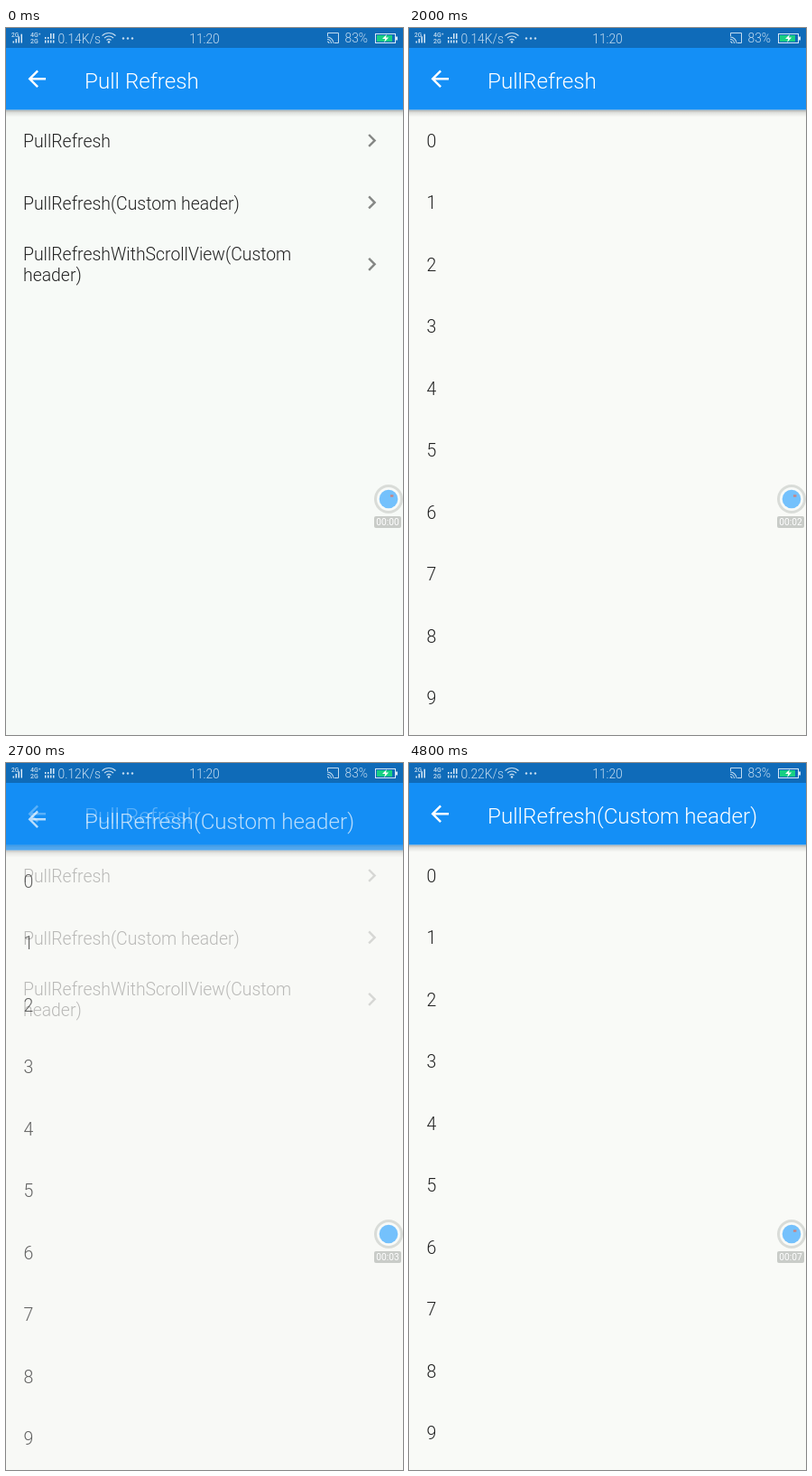
Animation, 440 px wide and 782 px high, one loop 4.9 s. Source, as an HTML page with a canvas:

```html
<!DOCTYPE html>
<html lang="zh">
<head>
<meta charset="utf-8">
<title>Pull Refresh</title>
<style>
html, body { margin: 0; width: 100%; height: 100%; overflow: hidden; background: #f7faf7; }
canvas { display: block; }
</style>
</head>
<body>
<canvas id="stage" width="440" height="782"></canvas>
<script>
const W = 440, H = 782, LOOP = 4900, ROW = 68.44, BAR = 90.5;
const c = document.getElementById('stage').getContext('2d');
const SANS = 'Roboto, "Noto Sans CJK SC", sans-serif';
const CJK = '"Noto Sans CJK SC", "Noto Sans CJK", sans-serif';
const BACK = new Path2D('M20 11H7.83l5.59-5.59L12 4l-8 8 8 8 1.41-1.41L7.83 13H20z');
const CHEVRON = new Path2D('M10 6L8.59 7.41 13.17 12l-4.58 4.59L10 18l6-6z');
const BOLT = new Path2D('M422 7l-5 5h3.3l-1.2 4 5-5.4h-3.2z');

// Keys are [time, value] pairs, linear in between
const FADE = [[200, 0], [300, .12], [400, .7], [500, 1], [2000, 1], [2100, .7], [2200, .3],
  [2300, 0], [2400, 0], [2500, .12], [2600, .38], [2700, .7], [2800, 1]];
const LIFT = [[200, 195], [300, 136], [400, 6], [500, 0], [2000, 0], [2100, 6], [2200, 80],
  [2300, 195], [2400, 195], [2500, 136], [2600, 40], [2700, 6], [2800, 0]];
const PULL = [[500, 0], [600, 70], [700, 122], [1500, 122], [1600, 60], [1700, 0], [2900, 0],
  [3100, 70], [3200, 125], [3300, 118], [3400, 98], [4500, 98], [4600, 55], [4700, 0]];
const RIPPLE = [[200, 0], [300, 103], [400, 0], [2300, 0], [2400, 48], [2500, 103], [2600, 0]];

function tween(t, keys) {
  const i = keys.findIndex(k => k[0] >= t);
  if (i < 0) return keys[keys.length - 1][1];
  if (i === 0) return keys[0][1];
  const [t0, v0] = keys[i - 1], [t1, v1] = keys[i];
  return v0 + (v1 - v0) * (t - t0) / (t1 - t0);
}

const ease = x => x * x * (3 - 2 * x);

function rect(x, y, w, h, color) {
  c.fillStyle = color;
  c.fillRect(x, y, w, h);
}

function text(str, x, y, size, color, weight = 300, family = SANS, align = 'left') {
  c.font = `${weight} ${size}px ${family}`;
  c.textAlign = align;
  c.fillStyle = color;
  c.fillText(str, x, y);
}

function disc(x, y, r, color) {
  c.fillStyle = color;
  c.beginPath();
  c.arc(x, y, r, 0, 7);
  c.fill();
}

function arc(x, y, r, from, to, width, color) {
  c.strokeStyle = color;
  c.lineWidth = width;
  c.beginPath();
  c.arc(x, y, r, from, to);
  c.stroke();
}

function icon(path, x, y, color) {
  c.save();
  c.translate(x, y);
  c.scale(1.222, 1.222);
  c.fillStyle = color;
  c.fill(path);
  c.restore();
}

function page(title, paper) {
  rect(0, BAR, W, H, paper);
  const shade = c.createLinearGradient(0, BAR, 0, BAR + 8);
  shade.addColorStop(0, 'rgba(0,0,0,.3)');
  shade.addColorStop(.4, 'rgba(0,0,0,.1)');
  shade.addColorStop(1, 'rgba(0,0,0,0)');
  rect(0, BAR, W, 8, shade);
  rect(0, 0, W, BAR, '#148ff6');
  icon(BACK, 19.6, 41.6, '#fff');
  text(title, 87, 66.5, 24.2, '#fff');
}

function menu(t) {
  page('Pull Refresh', '#f7faf7');
  const r = tween(t, RIPPLE);
  if (r) {
    c.save();
    c.beginPath();
    c.rect(0, BAR + (t > 2000 ? ROW : 0), W, ROW);
    c.clip();
    disc(329.5, t > 2000 ? 184 : 116, r, 'rgba(0,0,0,.06)');
    c.restore();
  }
  const lines = [['PullRefresh', 132], ['PullRefresh(Custom header)', 200.5],
    ['PullRefreshWithScrollView(Custom', 257], ['header)', 280]];
  for (const [str, y] of lines) text(str, 19, y, 19.4, '#222');
  for (let i = 0; i < 3; i++) icon(CHEVRON, 390.8, 109.8 + i * ROW, '#858785');
}

function header(t, custom, pull) {
  c.save();
  c.beginPath();
  c.rect(0, BAR, W, pull);
  c.clip();
  const sec = (t - (custom ? 3400 : 700)) * .00153;
  const turns = sec / 1.333 + (custom ? .38 : .5);
  const p = turns - Math.floor(turns);
  const head = ease(Math.min(1, p * 2)), tail = ease(Math.max(0, p * 2 - 1));
  const start = (custom ? -.4 : .35) + sec * 4.7 + (Math.floor(turns) + tail) * 4.7;
  arc(custom ? 175.5 : 174, 152.7, 12.3, start, start + .1 + (head - tail) * 4.6, 2.5, '#148ff6');
  text('正在刷新...', custom ? 195 : 196.5, 160, 17.1, custom ? '#222' : '#999', 300, CJK);
  c.restore();
}

function list(t) {
  const custom = t > 2350, pull = tween(t, PULL);
  c.save();
  c.globalAlpha = tween(t, FADE);
  c.translate(0, tween(t, LIFT));
  page(custom ? 'PullRefresh(Custom header)' : 'PullRefresh', '#f9faf7');
  if (pull) header(t, custom, pull);
  for (let i = 0; i < 11; i++) text(i, 19.5, 132 + pull + i * ROW, 19.5, '#222');
  c.restore();
}

function bars(x, dotted) {
  for (let i = 0; i < 4; i++) {
    const h = 2 + i * 2.6;
    rect(x + i * 3, 16.5 - (dotted ? 3 : h), 1.5, dotted ? 3 : h, '#d8e9f7');
    if (dotted) rect(x + i * 3, 6 + (i < 2 ? 4 : 0), 1.5, i < 2 ? 2 : 6, '#d8e9f7');
  }
}

function statusBar(t) {
  const ink = '#c4dcf0';
  rect(0, 0, W, 22, 'rgba(0,0,0,.25)');
  text('2G', 6, 9.5, 6.5, ink, 500);
  bars(10.5 - 3, false);
  text('4G⁺', 27, 10, 7, ink, 500);
  text('2G', 27, 17, 7, ink, 500);
  bars(43, true);
  const rate = t < 2200 ? '0.14' : t < 4300 ? '0.12' : '0.22';
  text(rate + 'K/s', 57.5, 16.5, 13.8, ink);
  for (const r of [3.5, 7, 10.5]) arc(114, 16, r, -2.36, -.78, 1.2, ink);
  disc(114, 15.5, 1.3, ink);
  for (let i = 0; i < 3; i++) disc(130 + i * 5, 11.5, 1.2, ink);
  text('11:20', 220, 16.8, 13.8, ink, 300, SANS, 'center');

  c.strokeStyle = ink;
  c.lineWidth = 1;
  c.beginPath();
  c.moveTo(356.5, 9);
  c.lineTo(356.5, 5.5);
  c.lineTo(368.5, 5.5);
  c.lineTo(368.5, 16.5);
  c.lineTo(364, 16.5);
  c.stroke();
  for (const r of [2, 4.5, 7]) arc(356, 17, r, -1.57, 0, 1.1, ink);
  text('83%', 375.5, 16.3, 13.8, ink);

  c.strokeStyle = '#d8e9f7';
  c.lineWidth = 1;
  c.strokeRect(409.5, 6.5, 22, 10);
  rect(432, 9.5, 2, 4, '#d8e9f7');
  rect(411, 8, 17, 7, '#18cf83');
  c.fillStyle = '#fff';
  c.fill(BOLT);
}

function recorder(t) {
  disc(424, 521, 16, '#d9dcd8');
  disc(424, 521, 13, '#f8faf8');
  disc(424, 521, 10.3, '#74c1fc');
  if (t < 2400 || t > 2800) rect(426, 516.3, 3.4, 2.4, '#c98482');
  c.fillStyle = '#c9ccc8';
  c.beginPath();
  c.roundRect(408, 540, 30, 13, 2);
  c.fill();
  const sec = Math.max(0, Math.floor((t - 200) * .00153));
  text('00:0' + sec, 423, 550.3, 10.2, '#fff', 400, SANS, 'center');
}

function draw(now) {
  let t = Math.floor(now % LOOP / 100) * 100;
  if (t < 300) t = 0;
  c.clearRect(0, 0, W, H);
  const shown = tween(t, FADE);
  if (shown < 1) menu(t);
  if (shown > 0) list(t);
  statusBar(t);
  recorder(t);
}

const begin = performance.now();
function tick() {
  draw(performance.now() - begin);
  requestAnimationFrame(tick);
}
tick();
</script>
</body>
</html>
```
